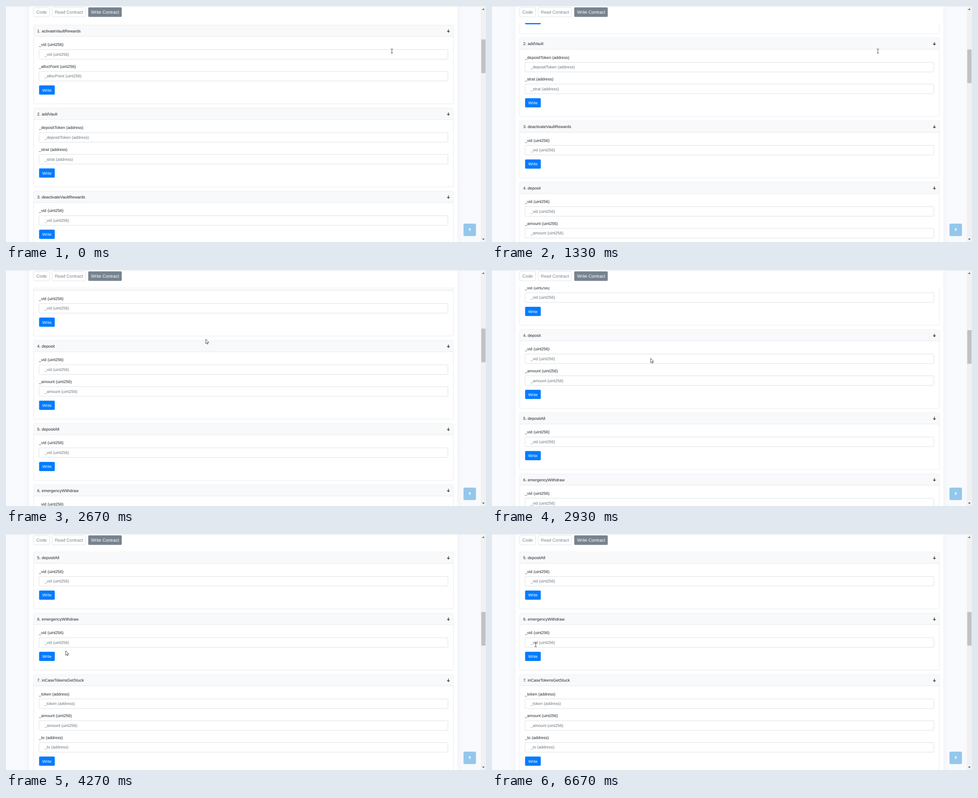
An HTML page that plays this animation: 1066 by 526 pixels, repeating every 7.99 s.

```html
<!DOCTYPE html>
<html lang="en">
<head>
<meta charset="utf-8">
<title>Write Contract</title>
<style>
  html, body { margin: 0; width: 100%; height: 100%; overflow: hidden; background: #f8fafd; }
  svg { display: block; width: 100%; height: 100%; }
  text { font-family: "Liberation Sans", Arial, sans-serif; font-size: 9.03px; fill: #212529;
         text-rendering: geometricPrecision; white-space: pre; }
  .tab { font-size: 9.72px; fill: #77838f; }
  .hint { fill: #6c757d; }
  .white { fill: #fff; }
  .status { font-family: "Open Sans", "Noto Sans", sans-serif; font-size: 7.8px; fill: #5f6368; }
</style>
</head>
<body>
<svg id="stage" viewBox="0 0 1066 526">
  <defs>
    <linearGradient id="fade">
      <stop offset="0" stop-color="#bdc5d1" stop-opacity="0"/>
      <stop offset=".5" stop-color="#bdc5d1" stop-opacity=".025"/>
      <stop offset="1" stop-color="#bdc5d1" stop-opacity=".1"/>
    </linearGradient>
    <clipPath id="pane"><rect x="52" y="38" width="950" height="488"/></clipPath>
  </defs>

  <rect width="1066" height="526" fill="#f8fafd"/>
  <rect x="36" width="16" height="526" fill="url(#fade)"/>
  <rect x="36" width="16" height="526" fill="url(#fade)" transform="translate(1054) scale(-1 1)"/>
  <rect x="52" width="950.3" height="526" fill="#fff"/>
  <rect width="1054.5" height=".8" fill="#dcdfe3"/>
  <g id="tabs"></g>
  <g clip-path="url(#pane)"><g id="list"></g></g>

  <rect x="1016" y="485" width="27.7" height="27.8" rx="3" fill="#94c7ea"/>
  <path d="M1029.9 502.3V496M1027.2 498.5L1029.9 495.8L1032.6 498.5" fill="none" stroke="#fff" stroke-width="1.2"/>

  <rect x="1054.5" width="11.5" height="526" fill="#f1f1f1"/>
  <path d="M1057.4 8.4L1060.2 5.4L1063 8.4ZM1057.4 518.6L1060.2 521.6L1063 518.6Z" fill="#505050"/>
  <rect id="thumb" x="1055.5" y="74.5" width="9.4" height="75" fill="#c1c1c1"/>

  <g id="status">
    <path d="M0 510.5H352Q355 510.5 355 513.5V526H0Z" fill="#9aa0a6" opacity=".35"/>
    <path d="M0 511.2H351.5Q354.2 511.2 354.2 514V526H0Z" fill="#dee1e6"/>
    <text class="status" x="3" y="521.5">https://qorlum.test/formscontract/panel.html?m=simple&amp;v=37.8.2.0&amp;a=0x72e90c4fb3a816...</text>
  </g>

  <g id="cursor">
    <path id="beam" d="M-2.4 -4.6H-.7L0 -4L.7 -4.6H2.4M0 -4V4M-2.4 4.6H-.7L0 4L.7 4.6H2.4" fill="none" stroke="#222" stroke-width=".85"/>
    <path id="arrow" d="M0 0V9.9L2.3 7.8L3.8 11.2L5.2 10.6L3.7 7.2H6.9Z" fill="#fff" stroke="#111" stroke-width=".75" stroke-linejoin="round"/>
    <path id="hand" d="M-.9 8.4V.8Q-.9 0 0 0T.9 .8V4.4Q1.9 3.9 2.5 4.8Q3.6 4.3 4.1 5.2Q5.7 4.9 5.7 6.3V9Q5.7 10.6 4.7 11.7V13.2H-.5V11.9L-3 8.7Q-3.6 7.6 -2.9 7T-.9 8.4ZM.9 4.4V6.6M2.5 4.8V6.8M4.1 5.2V7" fill="#fff" stroke="#111" stroke-width=".75" stroke-linejoin="round"/>
  </g>
</svg>
<script>
const LOOP = 7990, TICK = 200 / 3, NOTCH = 69.43, ROW = 48.6, LINE = "#dfe2e6";
const $ = id => document.getElementById(id);

const text = (x, y, str, cls = "") => `<text x="${x}" y="${y}" class="${cls}">${str}</text>`;
const box = (x, y, w, h, stroke) =>
  `<rect x="${x}" y="${y}" width="${w}" height="${h}" rx="2" fill="#fff" stroke="${stroke}" stroke-width=".75"/>`;
const block = (x, y, w, h, fill) =>
  `<rect x="${x}" y="${y}" width="${w}" height="${h}" rx="2" fill="${fill}"/>`;

const tab = (x, w, label) => box(x, 3.3, w, 20.8, "#d3d8df") + text(x + 6.2, 17.2, label, "tab");
$("tabs").innerHTML = tab(61.3, 35.2, "Code") + tab(102.2, 74.4, "Read Contract") +
  block(182.6, 3.1, 74.4, 21.2, "#77838f") + text(189, 17.2, "Write Contract", "tab white");

const vid = "_vid (uint256)", amount = "_amount (uint256)";
const cards = [
  ["activateVaultRewards", vid, "_allocPoint (uint256)"],
  ["addVault", "_depositToken (address)", "_strat (address)"],
  ["deactivateVaultRewards", vid],
  ["deposit", vid, amount],
  ["depositAll", vid],
  ["emergencyWithdraw", vid],
  ["inCaseTokensGetStuck", "_token (address)", amount, "_to (address)"]
];

function card(top, title, fields) {
  const end = fields.length * ROW, button = top + 37.1 + end;
  const rows = fields.map((name, i) => {
    const y = top + i * ROW;
    return text(73.1, y + 46.5, name) +
      box(73.4, y + 54.4, 908, 21.4, "#ced4da") +
      text(85.4, y + 68.1, name, "hint");
  });
  return box(61.4, top, 932, 78.2 + end, LINE) +
    `<path d="M61.8 ${top + .4}H993V${top + 25.3}H61.8Z" fill="#f8f9fb"/>` +
    `<path d="M61.4 ${top + 25.3}H993.4" stroke="${LINE}" stroke-width=".75"/>` +
    text(69.2, top + 16.2, title) +
    `<path d="M982.5 ${top + 9.4}v6.3m-2.8 -2.8l2.8 2.8l2.8 -2.8" fill="none" stroke="#212529" stroke-width="1.2"/>` +
    rows.join("") +
    block(73.5, button, 34.8, 20.5, "#007bff") +
    text(80.4, button + 13.5, "Write", "white");
}

let top0 = 42.7;
$("list").innerHTML = cards.map(([name, ...fields], i) => {
  const y = top0;
  top0 += 87.9 + fields.length * ROW;
  return card(y, `${i + 1}. ${name}`, fields);
}).join("");

const mix = (a, b, p) => a + (b - a) * p;
function ease(t, from, to) {
  const p = Math.min(1, Math.max(0, (t - from) / (to - from)));
  return p * p * (3 - 2 * p);
}

const rolls = [
  { from: 533, to: 733, notches: 1 },
  { from: 867, to: 1067, notches: 1 },
  { from: 1267, to: 1467, notches: 1 },
  { from: 2200, to: 2792, notches: 3 },
  { from: 3152, to: 3830, notches: 4 }
];
const home = { x: 857, y: 100.5 };
const moves = [
  { from: 1400, to: 2100, x: 443.6, y: 154.2 },
  { from: 2733, to: 3200, x: 212, y: 262.2 },
  { from: 3800, to: 4260, x: 132.7, y: 260.4 },
  { from: 6000, to: 6400, x: 100, y: 260.4 },
  { from: 6533, to: 6660, x: 97, y: 246.6 }
];

const scrollAt = t => NOTCH * rolls.reduce((sum, r) => sum + r.notches * ease(t, r.from, r.to), 0);

const pointerAt = t => moves.reduce((pos, m) => {
  const p = ease(t, m.from, m.to);
  return { x: mix(pos.x, m.x, p), y: mix(pos.y, m.y, p) };
}, home);

function shapeAt(t) {
  if (t < 1460 || t > 6660) return "beam";
  return t > 3330 && t < 3660 ? "hand" : "arrow";
}

function draw(ms) {
  // The screen refreshes 15 times a second
  const t = Math.floor((ms + 5) / TICK) * TICK;
  const scroll = scrollAt(t), { x, y } = pointerAt(t), shape = shapeAt(t);
  $("list").setAttribute("transform", `translate(0 ${-scroll})`);
  $("thumb").setAttribute("y", 74.5 + scroll * .143);
  $("status").setAttribute("opacity", ease(t, 3333, 3466) - ease(t, 3867, 4066));
  $("cursor").setAttribute("transform", `translate(${x} ${y})`);
  for (const id of ["beam", "arrow", "hand"])
    $(id).setAttribute("visibility", id === shape ? "visible" : "hidden");
}

const start = performance.now();
function frame() {
  draw((performance.now() - start) % LOOP);
  requestAnimationFrame(frame);
}
frame();
</script>
</body>
</html>
```
